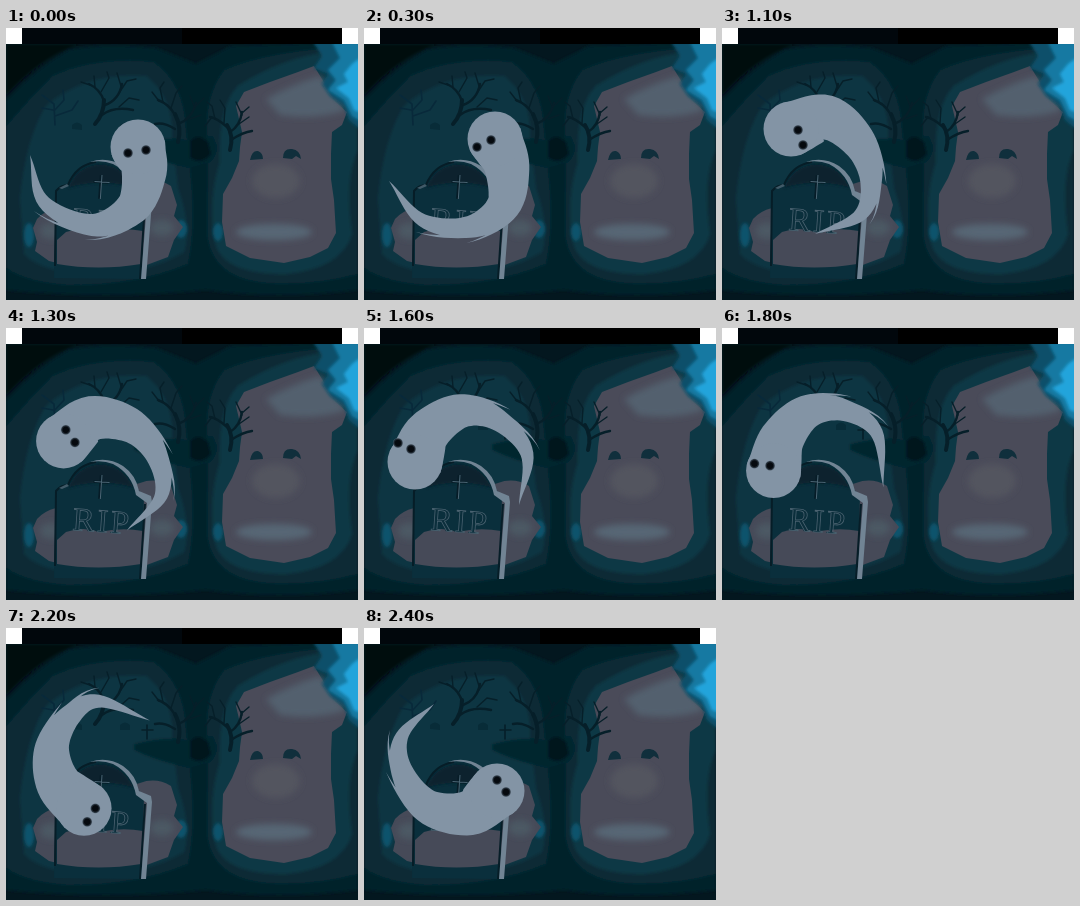
Animation of 352x272 px, one loop 2.5 s. Source, as an HTML page:

```html
<!DOCTYPE html>
<html lang="en">
<head>
<meta charset="utf-8">
<title>Graveyard ghost</title>
<style>
html, body { margin: 0; width: 100%; height: 100%; overflow: hidden; background: #02131b; }
svg { display: block; width: 352px; height: 272px; }
.tree { fill: none; stroke: #061f29; stroke-linecap: round; stroke-linejoin: round; }
.rip { font: 33px "Liberation Serif", Serif, serif; letter-spacing: 2.5px; }
</style>
</head>
<body>
<svg viewBox="0 0 352 272">
  <defs>
    <radialGradient id="eye">
      <stop offset=".5" stop-color="#05090e"/>
      <stop offset=".75" stop-color="#1b2630" stop-opacity=".85"/>
      <stop offset="1" stop-color="#8394a5" stop-opacity="0"/>
    </radialGradient>
    <filter id="soft"><feGaussianBlur stdDeviation="1.6"/></filter>
    <filter id="haze" x="-20%" y="-20%" width="140%" height="140%"><feGaussianBlur stdDeviation="3"/></filter>
  </defs>

  <!-- night glow -->
  <rect width="352" height="272" fill="#03171f"/>
  <g filter="url(#soft)">
    <path fill="#010a11" d="M0 16H74Q34 30 0 68Z"/>
    <path fill="#04202b" d="M0 72 Q30 40 62 22 Q100 14 150 20 L190 36 L225 18 L352 14 V262 Q270 272 200 262 Q100 272 0 262Z"/>
    <path fill="#072a36" d="M0 98 Q22 72 46 48 Q90 28 148 34 Q178 55 180 100 L185 150 Q190 200 182 236 Q130 258 60 257 Q20 254 0 240Z"/>
    <path fill="#0b3542" d="M14 170 Q20 110 40 78 Q80 44 140 48 Q168 70 166 110 L172 160 Q186 200 178 224 Q140 246 90 246 Q38 246 18 226Z"/>
    <path fill="#072a36" d="M202 118 Q196 70 218 42 Q262 22 352 18 V246 Q310 258 260 255 Q204 250 201 204Z"/>
    <path fill="#0b3745" d="M214 134 Q212 78 232 58 Q270 34 310 26 L352 22 V122 Q338 150 346 206 Q336 240 280 246 Q216 246 209 214 Q202 170 214 134Z"/>
    <path fill="#06252f" d="M128 116 Q156 108 180 112 L206 108 Q216 122 204 134 L184 140 Q152 134 128 122Z"/>
    <path fill="#03161f" d="M184 113 Q193 104 202 114 L205 126 Q196 138 184 130Z"/>
  </g>
  <g fill="#0d526c" filter="url(#soft)">
    <ellipse cx="23" cy="207" rx="5" ry="12"/>
    <ellipse cx="175" cy="201" rx="6" ry="9"/>
    <ellipse cx="212" cy="204" rx="5" ry="9"/>
  </g>

  <!-- pale ground and face-like mist -->
  <path fill="#464a58" d="M50 180 Q38 183 31 191 L27 200 L31 214 L29 223 L43 233 Q90 246 138 238 L162 229 L168 212 L177 199 L168 188 L171 177 L165 158 Q150 149 134 155Z"/>
  <path fill="#4a4b59" d="M308 38 L316 51 L324 63 L327 72 L341 84 L336 97 L326 104 L325 126 L325 151 L328 172 L330 205 L322 220 L304 229 L278 235 L244 230 L220 218 L216 194 L217 166 L226 150 L233 133 L234 119 L236 104 L230 78 L238 64 L264 54 L292 44Z"/>
  <g filter="url(#haze)">
    <path fill="#52606e" d="M260 71 Q285 57 314 48 L340 82 Q312 92 274 87Z"/>
    <ellipse cx="270" cy="153" rx="24" ry="17" fill="#52545f"/>
    <ellipse cx="268" cy="204" rx="38" ry="8" fill="#566674"/>
    <ellipse cx="45" cy="203" rx="11" ry="8" fill="#4b5864"/>
    <ellipse cx="156" cy="200" rx="12" ry="8" fill="#4b5864"/>
  </g>
  <path fill="#102f3c" d="M244 132 Q246 122 252 123 Q257 125 257 131Z M277 130 Q277 120 286 121 Q294 122 295 131 L290 128 L286 131Z"/>

  <!-- moonlit corner -->
  <g filter="url(#soft)">
    <path fill="#0d506b" d="M307 14 H360 V106 L343 92 L338 78 L324 68 L316 56 L322 46 L308 40 L316 28Z"/>
    <path fill="#1379a2" d="M326 14 H360 V96 L346 88 L338 72 L322 62 L330 52 L322 42 L334 30Z"/>
    <path fill="#20a4db" d="M360 26 L346 36 L338 46 L342 54 L330 60 L343 70 L348 82 L360 86Z"/>
  </g>

  <!-- trees and far graves -->
  <g class="tree">
    <path stroke-width="4" d="M89 96 Q98 86 98 72 M172 114 Q176 100 169 86 M224 122 Q228 108 221 97"/>
    <path stroke-width="2.4" d="M98 73 Q94 61 83 56 M99 77 Q113 72 116 56 M96 87 Q108 78 127 82
      M169 87 Q163 76 152 72 M172 96 Q186 91 190 75 M169 101 Q158 94 149 96
      M221 99 Q211 90 204 89 M224 104 Q234 98 236 84 M225 112 Q237 104 246 103"/>
    <path stroke-width="1.4" d="M89 59 L88 48 M84 57 L75 54 M95 64 L103 50 L101 44 M113 65 L121 53 L130 51 M115 58 L111 45 M113 79 L123 70 L133 72
      M157 74 L154 60 L158 54 M153 73 L146 64 M165 80 L170 65 L176 58 M184 91 L195 87 M189 80 L184 68 M190 78 L198 70
      M209 91 L206 78 L201 74 M206 89 L199 98 M218 95 L219 80 L214 72 M233 96 L243 89 M236 87 L230 74 M236 85 L243 79"/>
    <path stroke="#08293a" stroke-width="1.6" d="M49 97 L48 76 L36 67 M48 83 L58 72 L57 62 M49 88 L66 82 L72 73 M47 82 L36 80"/>
    <path stroke-width="1.6" d="M141 97 V111 M136 102 H147"/>
  </g>
  <path fill="#082c38" d="M66 101 V97 Q71 92 76 97 V102Z M114 102 V97 Q119 92 124 97 V102Z"/>

  <!-- tombstone -->
  <path fill="#0a2f3c" d="M48 250 L50 162 Q55 156 62 157 Q69 134 94 133 Q121 134 130 160 L138 167 L136 251Z"/>
  <path fill="#07232e" filter="url(#soft)" d="M62 160 Q70 138 94 136 Q118 137 128 160 Q95 150 62 160Z"/>
  <path fill="#464a58" d="M51 212 L60 204 Q78 198 93 204 Q116 199 137 203 L135 236 Q92 243 51 236Z"/>
  <path fill="none" stroke="#061d27" stroke-width="2" d="M49 238 L50 163 Q55 157 62 157 Q70 137 90 134 M139 176 L134 251"/>
  <path fill="#718494" d="M84 134 Q101 128 117 138 Q130 147 133 163 L145 168 L146 174 L140 251 L135 251 L141 175 L130 167 Q126 146 107 136 Q97 132 84 134Z"/>
  <path fill="#415a68" d="M53 160 L61 156 L63 158 L56 161Z"/>
  <g transform="rotate(4 94 190)" fill="none">
    <path stroke="#061c27" stroke-width="2.4" d="M92 147 V171 M85 154 H100"/>
    <path stroke="#4c6675" stroke-width="1" d="M93 147 V171 M86 154 H101"/>
    <text class="rip" x="66" y="204" fill="#0c2f3c">RIP</text>
    <text class="rip" x="67" y="204" stroke="#4a6270" stroke-width=".8">RIP</text>
  </g>

  <!-- ghost -->
  <g fill="#8394a5">
    <path id="body"/>
    <circle id="head"/>
  </g>
  <circle class="eye" r="5.6" fill="url(#eye)"/>
  <circle class="eye" r="5.6" fill="url(#eye)"/>

  <!-- upper edge -->
  <rect width="176" height="16" fill="#01070c"/>
  <rect x="176" width="160" height="16" fill="#000"/>
  <path fill="#fff" d="M0 0H16V16H0Z M336 0H352V16H336Z"/>
</svg>
<script>
const LOOP = 2500, STEP = 100, CX = 95, CY = 140, TURN = 2 * Math.PI;
const times = [0, 300, 700, 1100, 1600, 2000, 2400];
// Each pose: six spine points from head to tail, then the two eyes.
const poses = [
  [132,119, 138,145, 126,180, 86,197, 38,174, 24,127, 122,125, 140,122],
  [131,111, 143,140, 139,178, 105,199, 58,192, 25,153, 113,119, 127,112],
  [99,96, 130,108, 148,145, 138,180, 105,201, 48,195, 95,116, 101,102],
  [69,101, 106,90, 138,116, 149,152, 138,187, 93,206, 81,117, 76,102],
  [51,134, 65,103, 98,83, 134,92, 163,126, 155,177, 47,121, 34,115],
  [54,153, 56,118, 72,88, 103,76, 136,85, 163,138, 57,157, 41,161],
  [133,163, 104,185, 63,178, 38,143, 38,108, 70,76, 133,152, 142,164]
];
const widths = [27.5, 22.5, 17, 11, 6.5, 0];
const last = widths.length - 1;
const body = document.getElementById("body");
const head = document.getElementById("head");
const eyes = document.querySelectorAll(".eye");

// Polar tracks around the stone, unwrapped so every point circles one way.
const tracks = [];
for (let k = 0; k < 8; k++) {
  let before = Infinity;
  const angle = [], radius = [];
  for (const p of poses) {
    const x = p[2 * k] - CX, y = p[2 * k + 1] - CY;
    let a = Math.atan2(y, x);
    while (a > before + 0.3) a -= TURN;
    angle.push(before = a);
    radius.push(Math.hypot(x, y));
  }
  tracks.push({ angle, radius });
}

// Periodic monotone cubic; drift is the gain per loop.
function track(values, drift, t) {
  const n = times.length;
  const lap = i => Math.floor(i / n), at = i => i - lap(i) * n;
  const T = i => times[at(i)] + lap(i) * LOOP;
  const V = i => values[at(i)] + lap(i) * drift;
  const rate = i => (V(i + 1) - V(i)) / (T(i + 1) - T(i));
  const slope = i => {
    const a = rate(i - 1), b = rate(i);
    return a * b > 0 ? 2 * a * b / (a + b) : 0;
  };
  let i = n - 1;
  while (t < times[i]) i--;
  const h = T(i + 1) - T(i), s = (t - T(i)) / h, r = 1 - s;
  return V(i) * r * r * (1 + 2 * s) + V(i + 1) * s * s * (3 - 2 * s)
    + h * s * r * (slope(i) * r - slope(i + 1) * s);
}

function place({ angle, radius }, t) {
  const a = track(angle, -TURN, t), r = track(radius, 0, t);
  return [CX + r * Math.cos(a), CY + r * Math.sin(a)];
}

function curve(list, u) {
  const i = Math.min(last - 1, Math.floor(u * last)), s = u * last - i;
  const b = list[i], c = list[i + 1];
  const a = i ? list[i - 1] : 2 * b - c;
  const d = i + 2 <= last ? list[i + 2] : 2 * c - b;
  return b + s / 2 * (c - a + s * (2 * a - 5 * b + 4 * c - d + s * (3 * (b - c) + d - a)));
}

const width = u => Math.max(0, curve(widths, u));
const poly = list => "M" + list.map(p => p.map(v => v.toFixed(1)).join(" ")).join("L") + "Z";

function draw(t) {
  const pts = tracks.map(k => place(k, t));
  const xs = pts.slice(0, 6).map(p => p[0]), ys = pts.slice(0, 6).map(p => p[1]);
  // Point at a distance from the spine; positive faces away from the stone.
  const beside = (u, off) => {
    const v = Math.max(0, u - 0.01), w = Math.min(1, u + 0.01);
    const dx = curve(xs, w) - curve(xs, v), dy = curve(ys, w) - curve(ys, v);
    const len = Math.hypot(dx, dy) || 1;
    return [curve(xs, u) + dy / len * off, curve(ys, u) - dx / len * off];
  };
  const outer = [], inner = [];
  for (let i = 0; i <= 50; i++) {
    const u = i / 50;
    outer.push(beside(u, width(u)));
    inner.unshift(beside(u, -width(u)));
  }
  // Blade of mist peeling off the outer edge towards the tail.
  const wisp = (tip, out) => {
    const top = [], under = [];
    for (let i = 0; i <= 8; i++) {
      const s = i / 8, u = tip - 0.2 * (1 - s), lift = out * s * s;
      top.push(beside(u, width(u) + lift));
      under.unshift(beside(u, width(u) + lift - 5 * (1 - s)));
    }
    return poly(top.concat(under));
  };
  body.setAttribute("d", poly(outer.concat(inner)) + wisp(0.62, 5) + wisp(0.8, 7));
  head.setAttribute("cx", xs[0]);
  head.setAttribute("cy", ys[0]);
  head.setAttribute("r", widths[0]);
  eyes.forEach((e, i) => {
    e.setAttribute("cx", pts[6 + i][0]);
    e.setAttribute("cy", pts[6 + i][1]);
  });
}

const start = performance.now();
let shown = -1;
function frame() {
  const t = Math.floor((performance.now() - start) % LOOP / STEP) * STEP;
  if (t !== shown) draw(shown = t);
  requestAnimationFrame(frame);
}
frame();
</script>
</body>
</html>
```
